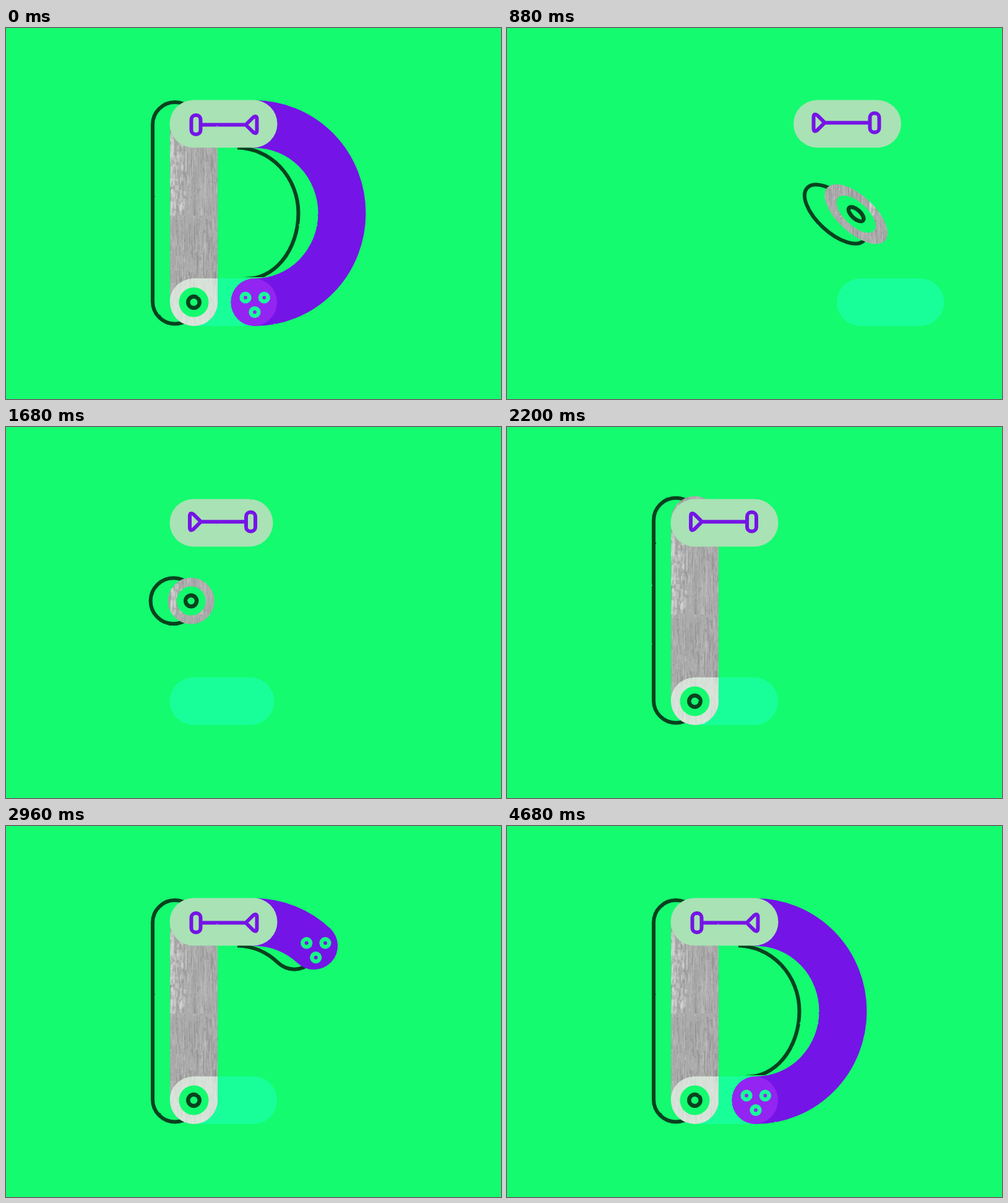
An HTML page with a canvas for the animation above (4840 ms loop, 800 px wide and 600 px high).

```html
<!DOCTYPE html>
<html lang="en">
<head>
<meta charset="utf-8">
<title>Letter D</title>
<style>
  html, body { margin: 0; width: 100%; height: 100%; overflow: hidden; background: #14fb6f; }
  canvas { display: block; filter: url(#rough); }
  svg { position: absolute; width: 0; height: 0; }
</style>
</head>
<body>
<canvas id="stage" width="800" height="600"></canvas>
<svg aria-hidden="true">
  <filter id="rough" x="0" y="0" width="100%" height="100%" color-interpolation-filters="sRGB">
    <feTurbulence id="noise" type="fractalNoise" baseFrequency="0.13" numOctaves="1" seed="1"/>
    <feDisplacementMap in="SourceGraphic" scale="1.8" xChannelSelector="R" yChannelSelector="G"/>
  </filter>
</svg>
<script>
const LOOP = 4840, STEP = 40;
const GREEN = '#14fb6f', TEAL = '#18ff9a', PALE = '#a9e2b5';
const PURPLE = '#7514e6', LILAC = '#9424f2', DARK = '#08421f';
const R = 38.5, TOP = 155, BOTTOM = 443.5, STEM_X = 303.5;

const stage = document.getElementById('stage');
const noise = document.getElementById('noise');
const ctx = stage.getContext('2d');

const clamp = x => Math.min(1, Math.max(0, x));
const span = (t, a, b) => clamp((t - a) / (b - a));
const lerp = (a, b, k) => a + (b - a) * k;
const easeInOut = u => 0.5 - 0.5 * Math.cos(Math.PI * u);
const easeOut = u => Math.sin(u * Math.PI / 2);
const bump = (t, a, b) => Math.sin(Math.PI * span(t, a, b)) ** 2;

function makeWood() {
  const w = 160, h = 600, seam = 303;
  const tile = document.createElement('canvas');
  tile.width = w;
  tile.height = h;
  const g = tile.getContext('2d');
  let seed = 7;
  const rnd = () => (seed = (seed * 16807) % 2147483647) / 2147483647;
  g.fillStyle = '#acacac';
  g.fillRect(0, 0, w, h);
  for (let i = 0; i < 9000; i++) {
    const x = rnd() * w, y = rnd() * h, len = 2 + rnd() ** 3 * 40;
    const shade = Math.round(lerp(110, 222, rnd()));
    g.fillStyle = `rgba(${shade},${shade},${shade},${0.12 + rnd() * 0.3})`;
    const end = y < seam ? Math.min(seam, y + len) : y + len;
    g.fillRect(x, y, 0.6 + rnd() * 1.5, end - y);
  }
  // flaked pale paint along the left side of the upper plank
  for (let i = 0; i < 130; i++) {
    g.fillStyle = 'rgba(215,215,215,.45)';
    g.fillRect(25 + rnd() ** 2 * 22, 165 + rnd() * 135, 1 + rnd() * 3, 3 + rnd() * 9);
  }
  return tile;
}
const wood = ctx.createPattern(makeWood(), 'repeat');
wood.setTransform(new DOMMatrix().translate(240, 0));

function fill(color) { ctx.fillStyle = color; ctx.fill(); }
function stroke(color, width) {
  ctx.strokeStyle = color;
  ctx.lineWidth = width;
  ctx.stroke();
}
function pillPath(left, right, top, bottom, r = R) {
  ctx.beginPath();
  ctx.roundRect(left, top, right - left, bottom - top, r);
}
function disc(x, y, r) {
  ctx.beginPath();
  ctx.arc(x, y, r, 0, Math.PI * 2);
}

function topPill(t) {
  let left = lerp(815, 464, easeOut(span(t, 420, 820)));
  left -= 199.5 * easeInOut(span(t, 850, 1520));
  return { left, right: left + 174 - 7 * bump(t, 1460, 1900) };
}

function bottomPill(t) {
  const enter = lerp(815, 535, easeOut(span(t, 360, 780)));
  const over = 8 * bump(t, 1200, 1440);
  return {
    left: enter - 270.5 * easeInOut(span(t, 860, 1228)) - over,
    right: enter + 173.5 - 270.5 * easeInOut(span(t, 860, 1198)) - over - 4.5 * bump(t, 1460, 1900)
  };
}

// Three arcs under gravity: in from the right, across, then straight up and down.
const HIT1 = 754, HIT2 = 1486, SINK = 1973;
function ballPose(t) {
  let x, y, u, vx, vy, k = 1, size = 1;
  if (t < HIT2) {
    const T = 366, falling = t < HIT1;
    u = (t - (falling ? HIT1 - T : HIT1 + T)) / T;
    vx = falling ? -0.55 : -0.443;
    x = 620 + vx * (t - HIT1);
    y = 252 + 114 * u * u;
    vy = 2 * 114 / T * u;
    k = 1 + 1.5 * u * u;
  } else {
    const T = 205;
    u = (t - HIT2 - T) / T;
    x = lerp(298, STEM_X, span(t, 1600, SINK));
    y = 281 + 85 * u * u;
    vx = 0;
    vy = u;
    k = 1 + 0.5 * Math.min(1, u * u) * (1 - span(t, 1850, SINK));
    size = 1 - 0.025 * bump(t, 1500, 1860);
  }
  let angle = Math.atan2(vy, vx), a = k, b = 1 / Math.sqrt(k);
  const near = Math.min(Math.abs(t - HIT1), Math.abs(t - HIT2));
  if (near < 45) { angle = 0; a = 1.28; b = 0.74; }
  return { x, y, angle, a: a * size, b: b * size };
}

function ellipseAt(p, r, dx = 0) {
  ctx.beginPath();
  ctx.ellipse(p.x + dx, p.y, r * p.a, r * p.b, p.angle, 0, Math.PI * 2);
}
function drawEye(p) {
  ellipseAt(p, 24);
  fill(GREEN);
  ellipseAt(p, 9.2);
  stroke(DARK, 6.5);
}

function stemTop(t) {
  const up = lerp(BOTTOM, TOP - 5, easeOut(span(t, 2020, 2170)));
  return up + 5.5 * easeInOut(span(t, 2180, 2300));
}

const ARC = { x: 402, y: 299.5, rx: 141, ry: 144 };
function arcPath(turn) {
  ctx.beginPath();
  ctx.ellipse(ARC.x, ARC.y, ARC.rx, ARC.ry, 0, -Math.PI / 2, turn - Math.PI / 2);
}
// The outline lags to the left and closes in on the band toward the bottom.
function outlinePath(turn) {
  const right = ARC.x + ARC.rx - 32.5;
  const quarter = (dx, from, to) => {
    const x = ARC.x + dx;
    ctx.ellipse(x, ARC.y, right - x, ARC.ry, 0, from, to);
  };
  const end = turn - Math.PI / 2;
  ctx.beginPath();
  quarter(-30, -Math.PI / 2, Math.min(0, end));
  if (end > 0) quarter(-12, 0, end);
}
function drawArcOutline(turn) {
  ctx.save();
  ctx.beginPath();
  ctx.rect(374, 154, 268, 249);
  ctx.clip();
  outlinePath(turn);
  stroke(DARK, 82);
  stroke(GREEN, 70);
  ctx.restore();
}
function drawDots(turn, inPill) {
  const x = ARC.x + ARC.rx * Math.sin(turn), y = ARC.y - ARC.ry * Math.cos(turn);
  for (const [dx, dy] of [[-15, -7.5], [15.3, -7.5], [0, 16]]) {
    disc(x + dx, y + dy, 6.3);
    stroke(inPill ? TEAL : '#16f887', 6.6);
  }
}

function drawShovel(x, y, angle) {
  ctx.save();
  ctx.translate(x, y);
  ctx.rotate(angle);
  ctx.beginPath();
  ctx.roundRect(-53, -15.5, 15, 31, 7);
  ctx.moveTo(-37, 0);
  ctx.lineTo(35, 0);
  ctx.moveTo(35, 0);
  ctx.lineTo(47, -12);
  ctx.quadraticCurveTo(53, -16, 53, -9);
  ctx.lineTo(53, 9);
  ctx.quadraticCurveTo(53, 16, 47, 12);
  ctx.closePath();
  stroke(PURPLE, 6);
  ctx.restore();
}

function draw(t) {
  ctx.fillStyle = GREEN;
  ctx.fillRect(0, 0, 800, 600);
  if (t >= 40 && t < 320) return;
  if (t < 40) t = LOOP - 1;

  const top = topPill(t), low = bottomPill(t);
  const lowPath = () => pillPath(low.left, low.right, 405, 482);
  const isStem = t >= SINK;
  const ball = isStem ? { x: STEM_X, y: BOTTOM, angle: 0, a: 1, b: 1 } : ballPose(t);
  const turn = Math.PI * easeInOut(span(t, 2845, 3200));
  const cap = stemTop(t);

  const bodyPath = () => isStem
    ? pillPath(STEM_X - R, STEM_X + R, cap - R, BOTTOM + R)
    : ellipseAt(ball, R);

  if (turn > 0) drawArcOutline(turn);
  lowPath();
  fill(TEAL);

  if (isStem) pillPath(237, 309, cap - 35.5, BOTTOM + 35, 36);
  else ellipseAt(ball, 38, lerp(-33, -28.5, span(t, 900, 1500)));
  stroke(DARK, 6);
  bodyPath();
  fill(wood);

  if (turn > 0) {
    arcPath(turn);
    stroke(PURPLE, 2 * R);
  }

  // everything seen through the lower pill is lighter
  ctx.save();
  lowPath();
  ctx.clip();
  bodyPath();
  fill('rgba(240,255,242,.65)');
  if (turn > 0) {
    arcPath(turn);
    stroke(LILAC, 2 * R);
  }
  ctx.restore();

  drawEye(ball);
  if (turn > 0) drawDots(Math.min(Math.PI, turn + 0.03), turn > 2.9);

  pillPath(top.left, top.right, 116.5, 193.5);
  fill(PALE);

  const flight = span(t, 2220, 2840);
  const lift = 250 * (1 - (2 * flight - 1) ** 2);
  drawShovel(top.left + 85.5 + 2.5 * flight, 153.2 + 3.3 * flight - lift, Math.PI * (1 + 3 * flight));
}

ctx.lineCap = 'round';
ctx.lineJoin = 'round';
let shown = -1, boil = -1;
function tick() {
  const t = Math.floor((performance.now() % LOOP) / STEP) * STEP;
  if (t !== shown) {
    shown = t;
    const next = Math.floor((t + 120) / 320) % 3;
    if (next !== boil) noise.setAttribute('seed', 1 + (boil = next));
    draw(t);
  }
  requestAnimationFrame(tick);
}
tick();
</script>
</body>
</html>
```
